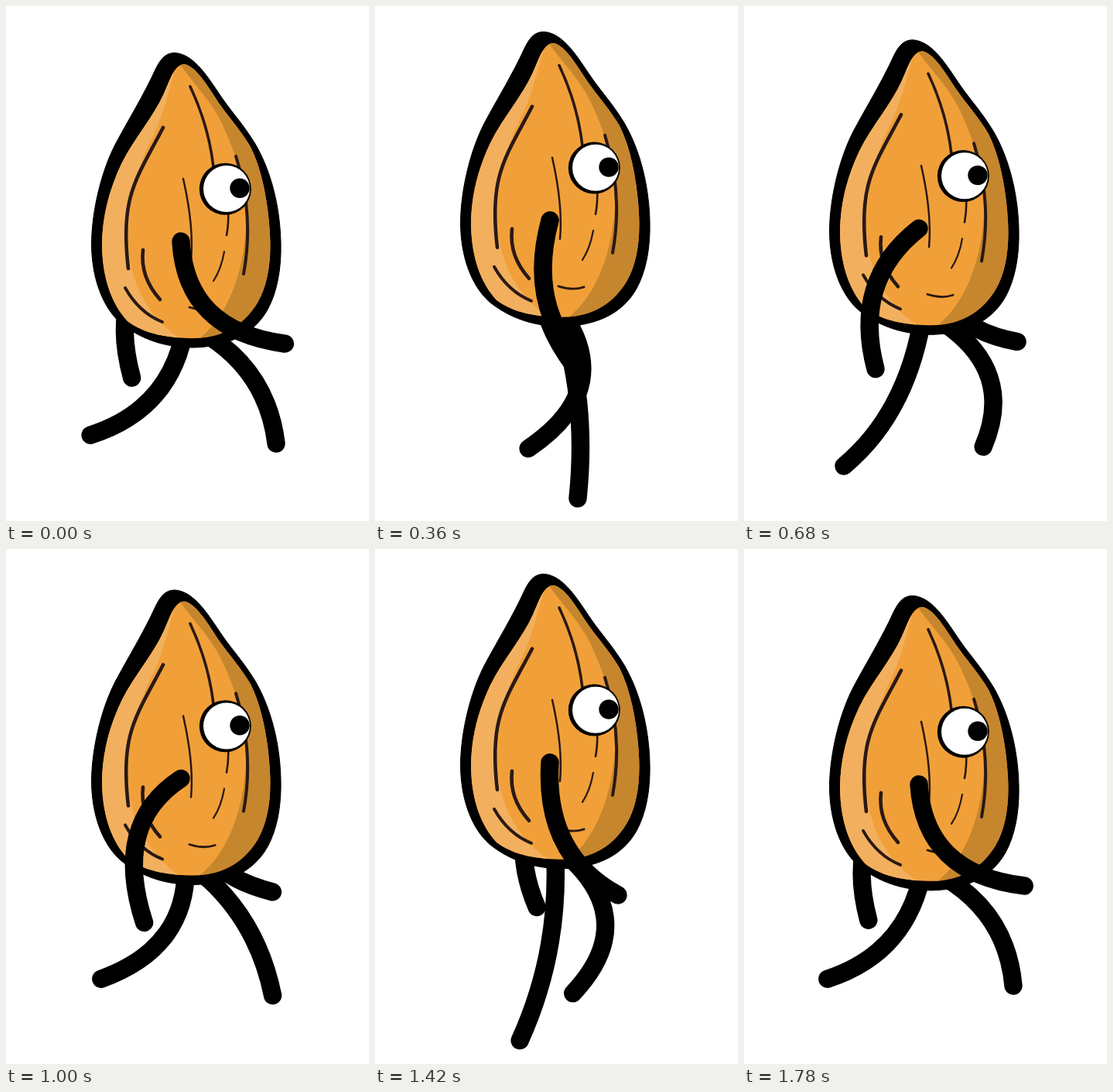
These frames come from a looping animation (469x665 px, 1.8 s). An HTML page:

```html
<!DOCTYPE html>
<html lang="en">
<head>
<meta charset="utf-8">
<title>Walking almond</title>
<style>
  html, body { margin: 0; width: 100%; height: 100%; overflow: hidden; background: #fff; }
  svg { display: block; width: 469px; height: 665px; }
  .limb { fill: none; stroke: #000; stroke-width: 23.4; stroke-linecap: round; }
  .grain { fill: none; stroke: #2a1915; stroke-linecap: round; }
</style>
</head>
<body>
<svg viewBox="0 0 469 665">
  <defs>
    <path id="skin" d="M230 75C217 76 212 96 204 113C190 144 166 170 149 204C132 240 124 275 124 310C125 354 137 385 157 407C179 424 212 429 243 429C282 428 308 411 325 383C338 361 343 330 341 295C339 258 332 214 316 182C303 160 288 144 274 124C261 104 245 77 230 75Z"/>
    <clipPath id="inside"><use href="#skin"/></clipPath>
  </defs>
  <path id="legA" class="limb"/>
  <path id="legB" class="limb"/>
  <path id="farArm" class="limb"/>
  <g id="body">
    <path stroke="#000" d="M218 60.5C205 60.5 199 70 193 82C178 115 158 147 141 179C122 216 110.5 268 110.5 308C111 360 130 395 150 411C180 434 212 441 243 441C280 440 318 428 338 392C350 370 356 340 355 305C354 260 343 214 322 178C306 152 294 140 280 120C262 94 244 62 218 60.5Z"/>
    <use href="#skin" fill="#f1a039"/>
    <g clip-path="url(#inside)">
      <path fill="#f2b05e" d="M222 70C212 100 206 132 192 164C170 205 157 255 158 305C160 355 180 400 228 432H100V70Z"/>
      <path fill="#c6862d" d="M224 74C238 96 266 122 281 156C295 188 311 225 310 285C307 345 285 405 246 432H360V60Z"/>
    </g>
    <g class="grain">
      <path stroke-width="3.6" d="M238 104Q262 155 268 208"/>
      <path stroke-width="4.6" d="M203 157C168 224 147 246 158 339"/>
      <path stroke-width="2.5" d="M229 223Q243 285 239 328"/>
      <path stroke-width="4" d="M297 194Q321 270 307 346"/>
      <path stroke-width="2.6" d="M287 262Q288 280 285 296"/>
      <path stroke-width="2.2" d="M282 317Q278 340 268 355"/>
      <path stroke-width="4.6" d="M177 315Q173 350 199 379"/>
      <path stroke-width="4" d="M154 364Q172 396 202 408"/>
      <path stroke-width="2.8" d="M237 389Q255 395 270 390"/>
    </g>
    <circle cx="283.3" cy="236.3" r="33.5"/>
    <circle cx="285" cy="236" r="30" fill="#fff"/>
    <circle cx="302" cy="235.3" r="12.7"/>
  </g>
  <path id="nearArm" class="limb"/>
</svg>
<script>
const LOOP = 1800;
const { sin, cos, PI } = Math;
const $ = id => document.getElementById(id);

// A swing is a mean plus cos and sin of the stride angle and its multiples
function swing(a, mean, c1, s1, c2 = 0, s2 = 0, s3 = 0) {
  return mean + c1 * cos(a) + s1 * sin(a) + c2 * cos(2 * a) + s2 * sin(2 * a) + s3 * sin(3 * a);
}

// Each limb is one curve from a joint on the body, past a bend, to its tip
const leg = {
  joint: [232, 410],
  bend: a => [swing(a, 287, 60, -41, -11, 2), swing(a, 492, -31, 14, -3)],
  tip: a => [swing(a, 227, 120, -5, 2, 8), swing(a, 583.5, 5.4, 29, -24, 1, -5)]
};
const arm = {
  joint: [226, 304],
  bend: a => [swing(a, 187, 52.5, -13, -7), swing(a, 383, 34, -6, 2)],
  tip: a => [swing(a, 261.5, 99, -29), swing(a, 458, -22, 2.5, 0, 7)]
};

function drawLimb(id, { joint: [x, y], bend, tip }, angle, dy) {
  $(id).setAttribute("d", `M${x} ${y + dy}Q${bend(angle)} ${tip(angle)}`);
}

function draw() {
  const angle = 2 * PI * (performance.now() % LOOP) / LOOP;
  // The body dips once per step, a little deeper on the first one
  const dip = cos(angle) < 0 ? 25.5 : 30;
  const dy = dip * cos(angle) ** 2 - 30;
  $("body").setAttribute("transform", `translate(0 ${dy})`);
  drawLimb("legA", leg, angle + PI, dy);
  drawLimb("legB", leg, angle, dy);
  drawLimb("farArm", arm, angle + PI, dy);
  drawLimb("nearArm", arm, angle, dy);
  requestAnimationFrame(draw);
}
draw();
</script>
</body>
</html>
```
